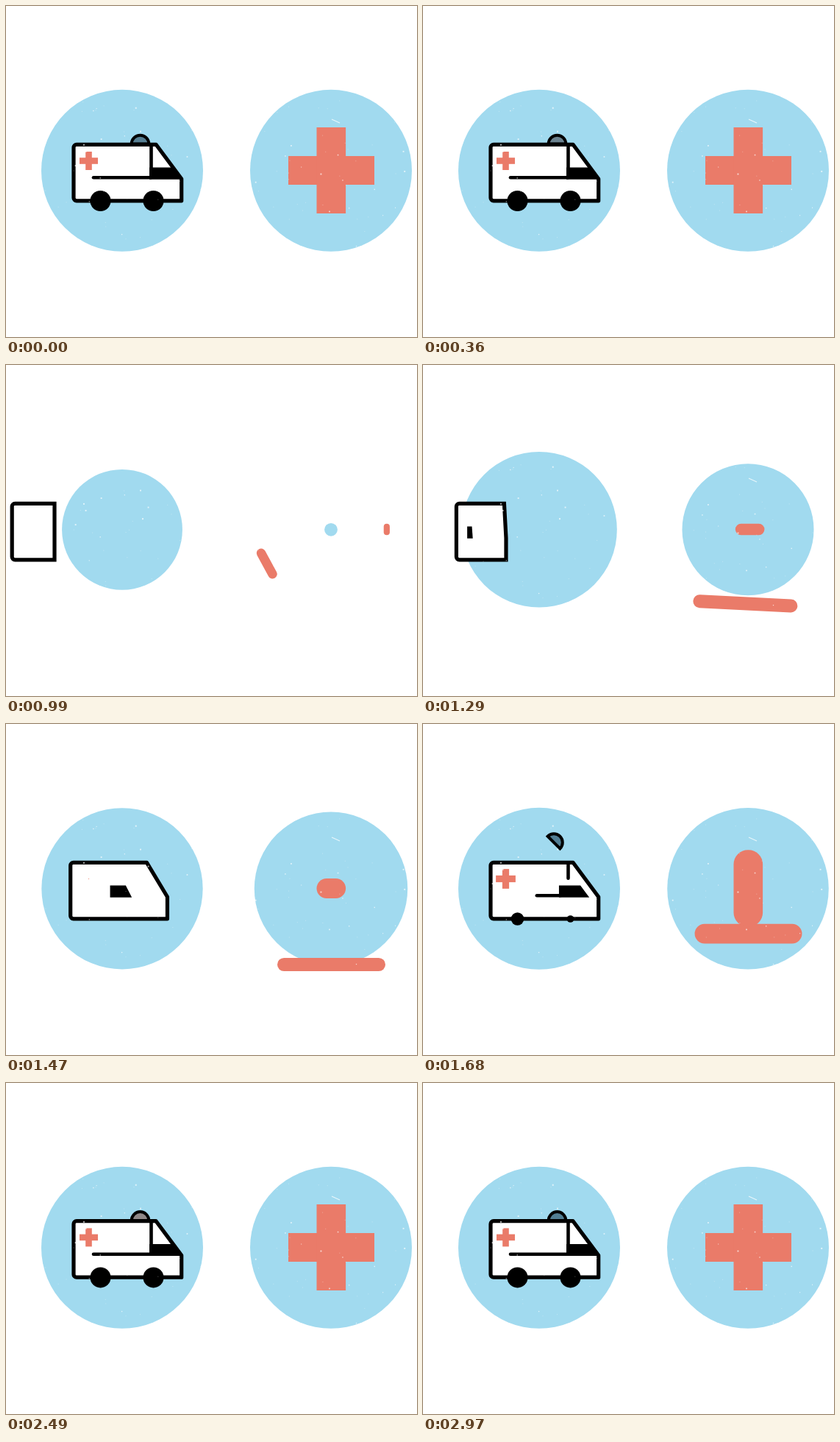
Recreate the animation shown at these times as an HTML page with a canvas. Size 559 by 450 pixels, loop 3000 ms.

```html
<!DOCTYPE html>
<html lang="en">
<head>
<meta charset="utf-8">
<title>Ambulance</title>
<style>
  html, body { margin: 0; width: 100%; height: 100%; overflow: hidden; background: #fff; }
  canvas { display: block; }
</style>
</head>
<body>
<canvas id="stage" width="559" height="450"></canvas>
<script>
const ctx = document.getElementById('stage').getContext('2d');
const LOOP = 3000, STEP = 30, ENTRY = 700;
const BLUE = '#a1daef', RED = '#ea7b69', BLACK = '#000', WHITE = '#fff';
const RADIUS = 110, MID = 223.8, LEFT = 158, RIGHT = 442;
const TOP = 188.3, LOW = 264.8;

// CSS-like cubic Bezier easing, solved by bisection.
function bezier(x1, y1, x2, y2) {
  const at = (a, b, s) => 3 * a * s * (1 - s) ** 2 + 3 * b * s * s * (1 - s) + s ** 3;
  return x => {
    let lo = 0, hi = 1;
    for (let i = 0; i < 20; i++) {
      const s = (lo + hi) / 2;
      if (at(x1, x2, s) < x) lo = s; else hi = s;
    }
    return at(y1, y2, lo);
  };
}

const smooth = bezier(.3, 0, .1, 1);
const windUp = bezier(.6, -.5, .3, 1);
const pop = bezier(.3, 0, .4, 1.4);
const quartic = x => x ** 4;

const lerp = (a, b, u) => a + (b - a) * u;

// Eased progress from 0 to 1 over a span of time.
function run(t, start, length, ease = smooth) {
  const u = (t - start) / length;
  return u <= 0 ? 0 : u >= 1 ? 1 : ease(u);
}

const remains = (t, start, end) => 1 - run(t, start, end - start, quartic);

function circle(x, y, r, color) {
  if (r <= 0) return;
  ctx.fillStyle = color;
  ctx.beginPath();
  ctx.arc(x, y, r, 0, Math.PI * 2);
  ctx.fill();
}

function stroke(width, join = 'round') {
  ctx.strokeStyle = BLACK;
  ctx.lineWidth = width;
  ctx.lineCap = 'round';
  ctx.lineJoin = join;
  ctx.stroke();
}

function segment(x0, y0, x1, y1) {
  ctx.beginPath();
  ctx.moveTo(x0, y0);
  ctx.lineTo(x1, y1);
  stroke(4.6);
}

// Runs paint() scaled about a point.
function scaled(x, y, sx, sy, paint) {
  if (sx <= 0 || sy <= 0) return;
  ctx.save();
  ctx.translate(x, y);
  ctx.scale(sx, sy);
  ctx.translate(-x, -y);
  paint();
  ctx.restore();
}

// Runs paint() with the origin moved and turned.
function placed(x, y, degrees, paint) {
  ctx.save();
  ctx.translate(x, y);
  ctx.rotate(degrees * Math.PI / 180);
  paint();
  ctx.restore();
}

function bar(x, y, w, h, degrees, radius) {
  if (w <= 0 || h <= 0) return;
  placed(x, y, degrees, () => {
    ctx.fillStyle = RED;
    ctx.beginPath();
    ctx.roundRect(-w / 2, -h / 2, w, h, Math.min(radius, w / 2, h / 2));
    ctx.fill();
  });
}

function drawCross(t) {
  const square = run(t, 1650, 350), radius = lerp(20, 0, square);

  const swing = run(t, 929, 508), rise = run(t, 1590, 375), born = run(t, 870, 100);
  const flatY = lerp(265, 327, swing) + lerp(0, 223.5 - 327, rise);
  const flatW = lerp(36, 147, swing) - 30 * square;
  const flatH = lerp(12, 18.2, swing) + 20.8 * rise;
  bar(lerp(347, 442.5, swing), flatY, flatW * born, flatH * born, lerp(67, 0, swing), radius);

  const slide = run(t, 911, 492), stretch = run(t, 1400, 510);
  const uprightH = lerp(15.5, 117, stretch) * Math.min(1, slide * 6);
  bar(lerp(533, 442.3, slide), 223.5, 39.6 * Math.min(1, slide + .04 * born), uprightH, 0, radius);
}

function drawLight(t) {
  if (t < 1560) return;
  const p = Math.min(1, (t - 1560) / 360), q = 1 - p;
  const hop = 9 * Math.sin(Math.PI * run(t, 2130, 200, x => x));
  const y = 187.5 + 14 * q * q - 147 * p * q - hop;
  const glow = t < 2330 ? 0 : .5 - .5 * Math.cos((t - 2330) / 320 * Math.PI * 2);
  const [r, g, b] = [lerp(82, 143, glow), lerp(126, 136, glow), lerp(148, 136, glow)];
  placed(182.5 - 6.75 * q, y, 67 * q, () => {
    ctx.beginPath();
    ctx.arc(0, 0, 11.8, Math.PI, 0);
    ctx.closePath();
    ctx.fillStyle = `rgb(${r},${g},${b})`;
    ctx.fill();
    stroke(4, 'miter');
  });
}

function drawBody(t) {
  const enter = 88 * (run(t, 780, 210) - 1);
  const edge = (from, to, length) => enter + lerp(from, to, run(t, 990, length, windUp));
  const back = edge(8.2, 92, 600), roof = edge(66, 204, 645), nose = edge(66, 238.7, 665);
  const r = 4;
  ctx.beginPath();
  ctx.moveTo(back + r, TOP);
  ctx.lineTo(roof, TOP);
  ctx.lineTo(nose, 235);
  ctx.lineTo(nose, LOW);
  ctx.arcTo(back, LOW, back, TOP, r);
  ctx.arcTo(back, TOP, nose, TOP, r);
  ctx.closePath();
  ctx.fillStyle = WHITE;
  ctx.fill();
  stroke(5.2, t < 1400 ? 'miter' : 'round');
}

function drawDash(t, lineScale) {
  if (t <= 1230) return;
  const drive = run(t, 1250, 677), top = 219.5, low = 235.7;
  const back = lerp(58, 195, drive), line = 76 * run(t, 1590, 380) * lineScale;
  ctx.beginPath();
  ctx.moveTo(back, top);
  ctx.lineTo(lerp(64, 226, drive), top);
  ctx.lineTo(lerp(65, 239, drive), low);
  ctx.lineTo(back, low);
  ctx.fillStyle = BLACK;
  ctx.fill();
  if (line > 1) segment(back - line, 233.3, back + 2, 233.3);
}

function drawFittings(t) {
  if (t > 1600) segment(197.5, TOP, 197.5, lerp(TOP, 233, run(t, 1600, 300)));
  const s = run(t, 1440, 308, pop), long = 25 * s, thin = 8.6 * s;
  bar(112.5, 210.5, long, thin, 0, 0);
  bar(112.5, 210.5, thin, long, 0, 0);
  circle(128.5, 265, 14 * run(t, 1600, 240), BLACK);
  circle(200.5, 265, 14 * run(t, 1627, 240), BLACK);
}

// Worn-print flecks, fixed on the stage.
function drawFlecks() {
  let seed = 29;
  const random = () => (seed = seed * 16807 % 2147483647) / 2147483647;
  for (let i = 0; i < 90; i++) {
    const a = random() * Math.PI * 2, d = RADIUS * Math.sqrt(random());
    const size = i % 3 ? 1 : 1 + random();
    ctx.fillStyle = `rgba(255,255,255,${i % 3 ? .35 : .7})`;
    ctx.fillRect((i % 2 ? LEFT : RIGHT) + d * Math.cos(a), MID + d * Math.sin(a), size, size);
  }
  ctx.strokeStyle = 'rgba(255,255,255,.75)';
  ctx.lineWidth = 1.2;
  ctx.beginPath();
  ctx.moveTo(443, 154);
  ctx.lineTo(454, 159);
  ctx.stroke();
}

function draw(t) {
  // While leaving, parts keep their finished pose and only collapse.
  const leaving = t < ENTRY, pose = leaving ? LOOP + t : t;
  const leftOut = remains(t, 400, 640), rightOut = remains(t, 390, 630);
  const squeeze = leaving ? remains(t, 400, 668) : 1;
  const shrink = leaving ? leftOut : 1;
  const cross = leaving ? rightOut : 1;
  const shake = pose > 2190 && t / STEP % 2 ? -.6 : 0;

  ctx.fillStyle = WHITE;
  ctx.fillRect(0, 0, 559, 450);
  circle(LEFT, MID, RADIUS * (leftOut + run(t, 600, 950) * (t > 640)), BLUE);
  circle(RIGHT, MID, RADIUS * (rightOut + run(t, 888, 850)), BLUE);

  scaled(442.4, 223.5, cross, cross, () => drawCross(pose));

  ctx.save();
  ctx.translate(0, shake);
  const van = (sy, paint) => scaled(164.5, 227, squeeze, sy, paint);
  van(shrink, () => {
    drawLight(pose);
    drawBody(pose);
  });
  van(1, () => drawDash(pose, shrink));
  van(shrink, () => drawFittings(pose));
  ctx.restore();
  drawFlecks();
}

const start = performance.now();
function tick() {
  const t = (performance.now() - start) % LOOP;
  draw(Math.floor(t / STEP) * STEP);
  requestAnimationFrame(tick);
}
tick();
</script>
</body>
</html>
```
